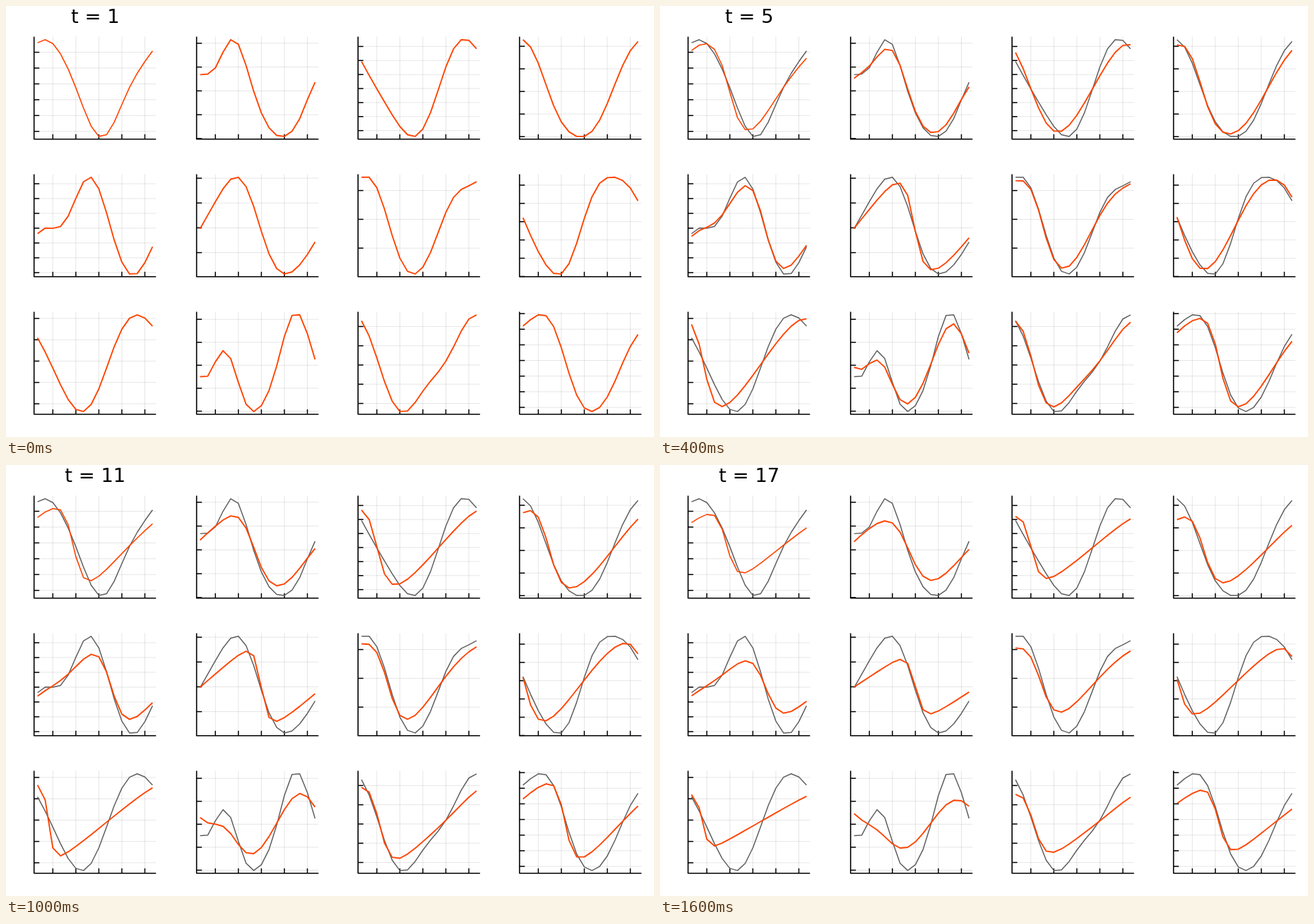
Animation of 917x611 px, one loop 2 s. Source, as an HTML page with a canvas:

```html
<!DOCTYPE html>
<html>
<head>
<meta charset="utf-8">
<style>
  html, body { margin: 0; width: 100%; height: 100%; overflow: hidden; background: #fff; }
  canvas { display: block; }
</style>
</head>
<body>
<canvas id="stage" width="917" height="611"></canvas>
<script>
const ctx = document.getElementById('stage').getContext('2d');

// Twelve periodic fields, each advected and diffused by the viscous Burgers equation.
const POINTS = 16, REFINE = 8, CELLS = POINTS * REFINE;
const SNAPSHOTS = 17, SUBSTEPS = 64;
const VISCOSITY = 0.01, DX = 1 / CELLS, DT = 1 / (SNAPSHOTS * SUBSTEPS);

// Each field starts as a few harmonics: [cos, sin] pairs in thousandths.
const fields = [
  { waves: [[288, 65], [-36, 6], [8, 7]] },
  { waves: [[32.4, 85.8], [-8.8, -20], [7.8, -10.2], [2.6, -0.7]], tick: 0.05 },
  { waves: [[241, -235], [-48, -7]] },
  { waves: [[215, -43], [15, -1], [-1, 5]] },
  { waves: [[-79, 104], [57, -20], [3.5, 6.4]], tick: 0.05 },
  { waves: [[4, 379], [-18, -59], [7, 5]], tick: 0.2 },
  { waves: [[158, -58], [-10, 32], [-2, 8]] },
  { waves: [[8, -271], [20, 23], [-6, -8]] },
  { waves: [[299, -476], [-26, 43]], tick: 0.25 },
  { waves: [[44.5, -49], [-59, 5.5], [-13, -2], [2.5, -1.6]], tick: 0.05 },
  { waves: [[189, -142], [47, 0], [-6, -1]] },
  { waves: [[266, 162], [-42, -4], [-4, -13]] }
];

function sumWaves(waves) {
  return Array.from({ length: CELLS }, (_, j) =>
    waves.reduce((sum, [c, s], m) => {
      const angle = 2 * Math.PI * (m + 1) * j / CELLS;
      return sum + (c * Math.cos(angle) + s * Math.sin(angle)) / 1000;
    }, 0));
}

function advance(u) {
  return u.map((v, i) => {
    const left = u[(i + CELLS - 1) % CELLS], right = u[(i + 1) % CELLS];
    const flux = (right * right - left * left) / (4 * DX);
    return v + DT * (VISCOSITY * (left - 2 * v + right) / (DX * DX) - flux);
  });
}

function evolve(u) {
  const history = [];
  for (let t = 0; t < SNAPSHOTS; t++) {
    history.push(u.filter((_, i) => i % REFINE === 0));
    for (let s = 0; s < SUBSTEPS; s++) u = advance(u);
  }
  return history;
}

const LEFT = 39.7, RIGHT = 212.3, TOP = 43.4, BOTTOM = 188.8;
const HIGHEST = 47.8, LOWEST = 184.9;
const COLUMNS = [0, 230, 458.5, 687], ROW_HEIGHT = 195;
const xAt = i => 44.6 + 10.85 * i;

// The vertical axis fits the starting curve.
const panels = fields.map(({ waves, tick = 0.1 }) => {
  const history = evolve(sumWaves(waves));
  const max = Math.max(...history[0]), min = Math.min(...history[0]);
  const scale = (LOWEST - HIGHEST) / (max - min);
  const yAt = v => HIGHEST + (max - v) * scale;
  const yTicks = [-3, -2, -1, 0, 1, 2, 3].map(k => yAt(k * tick))
    .filter(y => y > TOP && y < BOTTOM + 0.3);
  return { yTicks, curves: history.map(u => u.map((v, i) => [xAt(i), yAt(v)])) };
});

function stroke(color, width, points) {
  ctx.strokeStyle = color;
  ctx.lineWidth = width;
  ctx.beginPath();
  points.forEach(([x, y]) => ctx.lineTo(x, y));
  ctx.stroke();
}

function drawPanel({ curves, yTicks }, index, t) {
  const GRID = 'rgba(0,0,0,0.1)';
  const xTicks = [2, 5, 8, 11, 14].map(xAt);

  ctx.save();
  ctx.translate(COLUMNS[index % 4], ROW_HEIGHT * Math.floor(index / 4));
  xTicks.forEach(x => stroke(GRID, 1, [[x, TOP], [x, BOTTOM]]));
  yTicks.forEach(y => stroke(GRID, 1, [[LEFT, y], [RIGHT, y]]));
  stroke('#000', 1.6, [[LEFT, TOP], [LEFT, BOTTOM], [RIGHT, BOTTOM]]);
  xTicks.forEach(x => stroke('#000', 1.5, [[x, BOTTOM], [x, BOTTOM - 7]]));
  yTicks.forEach(y => stroke('#000', 1.5, [[LEFT, y], [LEFT + 7.5, y]]));
  if (t) stroke('#606060', 1.5, curves[0]);
  stroke('#ff4500', index ? 1.9 : 1.6, curves[t]);
  ctx.restore();
}

function draw(now) {
  const t = Math.min(SNAPSHOTS - 1, Math.floor(now % 2000 / 100));
  ctx.fillStyle = '#fff';
  ctx.fillRect(0, 0, 917, 611);
  ctx.fillStyle = '#000';
  ctx.font = '27.4px "DejaVu Sans", sans-serif';
  ctx.textAlign = 'center';
  ctx.fillText(`t = ${t + 1}`, 126.3, 24);
  ctx.lineJoin = 'round';
  panels.forEach((panel, index) => drawPanel(panel, index, t));
}

const began = performance.now();
function loop() {
  draw(performance.now() - began);
  requestAnimationFrame(loop);
}
loop();
</script>
</body>
</html>
```
